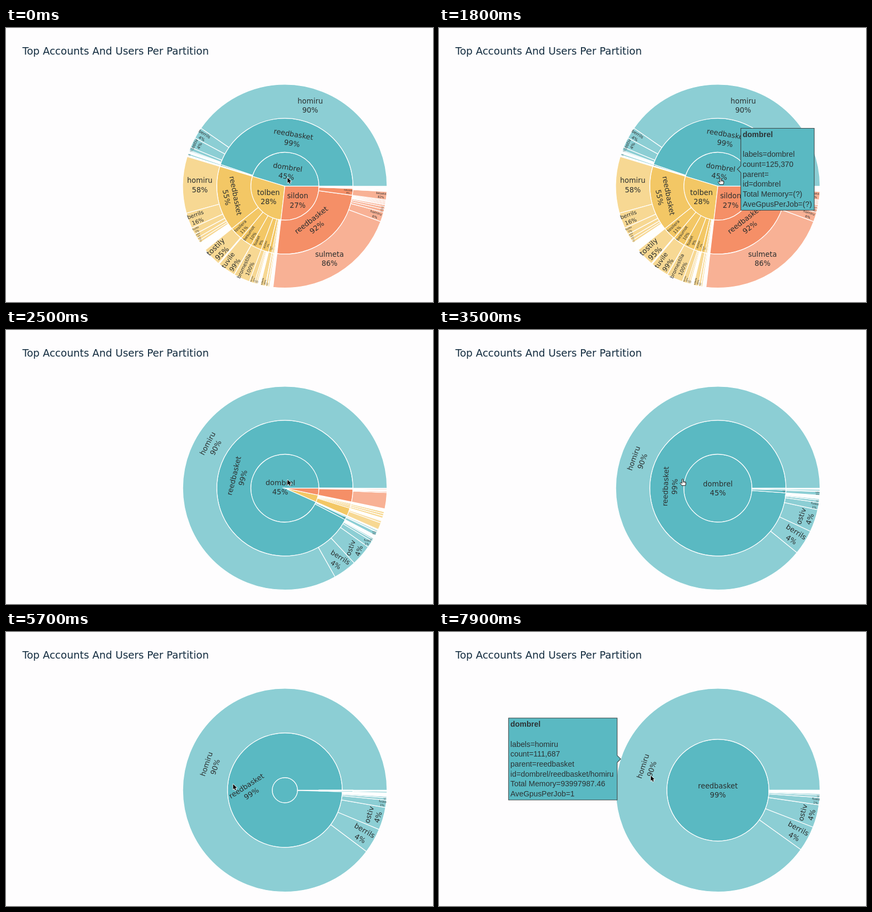
These frames come from a looping animation (800x515 px, 8000 ms). An HTML page with a canvas:

```html
<!DOCTYPE html>
<html lang="en">
<head>
<meta charset="utf-8">
<title>Top Accounts And Users Per Partition</title>
<style>
html, body { margin: 0; width: 100%; height: 100%; overflow: hidden; background: #fefdfe; }
canvas { display: block; width: 800px; height: 515px; }
</style>
</head>
<body>
<canvas id="stage"></canvas>
<script>
const W = 800, H = 515, CX = 522.5, CY = 297.3, R = 191.4;
const LOOP = 8000, ZOOM = 750, ZOOM_A = 1842, ZOOM_B = 5230;
const SIZE = 13.4;
const SANS = '"DejaVu Sans", Verdana, sans-serif';
const ARIAL = '"Liberation Sans", Arial, sans-serif';

const canvas = document.getElementById('stage');
const ctx = canvas.getContext('2d');
const dpr = window.devicePixelRatio || 1;
canvas.width = W * dpr;
canvas.height = H * dpr;

const lerp = (a, b, p) => a + (b - a) * p;
const clamp = v => Math.max(0, Math.min(1, v));
const rad = deg => deg * Math.PI / 180;

// Pose of a label in each zoom stage: [h|t|r = level, tangential, radial; radius; size]
const node = (share, name = '', pct = '', poses = [], kids = []) =>
  ({ share, name, pct, poses, kids, box: [], exit: [] });
const thin = (n, total) => Array.from({ length: n }, () => node(total / n));

const mainAccount = node(98.89, 'reedbasket', '99%', [['t', 90.5], ['t', 89.7], ['h', 0]], [
  node(90.09, 'homiru', '90%', [['h', 159], ['t', 159], ['t', 139]]),
  node(4, 'berrils', '4%', [['r', 179.5, 7.8], ['r', 168], ['r', 167]]),
  node(3.6, 'ostiv', '4%', [['t', 182, 7.8], ['t', 173], ['t', 173]]),
  node(1.15, 'fusko', '1%', [['r', 187, 2.6], ['r', 184, 5.4], ['r', 184.5, 5.4]]),
  node(0.37, 'lodet', '0%', [['r', 188, 1], ['r', 188, 2], ['r', 188, 2]]),
  node(0.22),
  ...thin(9, 0.57)
]);

const teal = node(45.3, 'dombrel', '45%', [['t', 27.5], ['h', 0]], [
  mainAccount,
  node(0.67, 'nusto', '1%', [['r', 125, 1], ['r', 124, 2]], [
    node(88, 'selbo', '90%', [['r', 188, 1.5], ['r', 187, 3]]), ...thin(2, 12)]),
  node(0.27, '', '', [], [node(90), node(10)]),
  ...thin(3, 0.17)
]);

const yellow = node(27.85, 'tolben', '28%', [['h', 36.7]], [
  node(55.6, 'reedbasket', '55%', [['t', 102.5]], [
    node(58, 'homiru', '58%', [['h', 159.5]]),
    node(16, 'berrils', '16%', [['r', 176, 10.2]]),
    node(7, 'fusko', '7%', [['r', 185, 4.8]]),
    node(4.6, 'ostiv', '5%', [['r', 186, 3.4]]),
    node(3, 'lodet', '3%', [['r', 187, 2.2]]),
    node(2.4, 'nerik', '2%', [['r', 188, 1.8]]),
    ...thin(14, 9)
  ]),
  node(11.1, 'tosilera', '11%', [['r', 112, 7.7]], [
    node(95, 'tostily', '95%', [['r', 172.5]]), ...thin(2, 5)]),
  node(10.4, 'besumot', '10%', [['r', 111, 7.3]], [
    node(99, 'tuvile', '99%', [['r', 175, 12]]), node(1)]),
  node(9.2, 'fosket', '9%', [['r', 115, 6.6]], [
    node(100, 'bromestila', '100%', [['r', 168.5, 9.4]])]),
  node(6.5, 'dulsko', '7%', [['r', 116, 4.6]], [
    node(45, 'denolo', '45%', [['r', 185, 3.4]]),
    node(16, 'lusk', '16%', [['r', 187, 2.2]]),
    node(13, 'bost', '13%', [['r', 187, 1.8]]),
    ...thin(5, 26)
  ]),
  node(3, 'felsok', '3%', [['r', 120, 2.8]], [
    node(95, 'noleda', '95%', [['r', 184, 4]]), node(5)]),
  node(1.4, '', '', [], [node(88, 'pelso', '88%', [['r', 187, 2]]), ...thin(2, 12)]),
  node(0.9, '', '', [], [node(90), node(10)]),
  ...thin(4, 1.9)
]);

const orange = node(26.85, 'sildon', '27%', [['h', 36]], [
  node(92, 'reedbasket', '92%', [['t', 89]], [
    node(86, 'sulmeta', '86%', [['h', 160]]),
    node(6.2, 'homiru', '6%', [['r', 178, 6.3]]),
    node(1.9, 'ostiv', '2%', [['r', 187, 2.4]]),
    node(1.6, 'lodet', '2%', [['r', 187, 2]]),
    node(1.2),
    ...thin(5, 3.3)
  ]),
  node(6, 'kelundo', '6%', [['r', 119, 4]], [
    node(82, 'besoka', '82%', [['r', 181, 5.4]]), ...thin(3, 18)]),
  node(0.7, '', '', [], thin(2, 1)),
  ...thin(3, 1.3)
]);

const all = [];

function collect(n, depth, rgb) {
  n.depth = depth;
  const a = depth === 2 ? 0.7 : 1;
  n.fill = 'rgb(' + rgb.map(c => Math.round(lerp(255, c, a))).join() + ')';
  all.push(n);
  n.kids.forEach(k => collect(k, depth + 1, rgb));
}

function place(n, x0, x1, depth, rings, stage) {
  n.box[stage] = { x0, x1, r0: depth * R / rings, r1: (depth + 1) * R / rings };
  spread(n.kids, x0, x1, depth + 1, rings, stage);
}

function spread(kids, x0, x1, depth, rings, stage) {
  const sum = kids.reduce((s, k) => s + k.share, 0);
  let a = x0;
  for (const k of kids) {
    const b = a + (x1 - x0) * k.share / sum;
    place(k, a, b, depth, rings, stage);
    a = b;
  }
}

// Slices that leave: inner ones shrink to the hub, the rest fold up at the end angle.
function setExits(entry, stage) {
  const e = entry.box[stage];
  for (const n of all) {
    const b = n.box[stage];
    if (!b || n.box[stage + 1]) continue;
    n.exit[stage] = b.r1 < e.r1 - 0.01
      ? { x0: b.x0, x1: b.x1, r0: 0, r1: 0 }
      : { x0: 360, x1: 360, r0: b.r0, r1: b.r1 };
  }
}

const tops = [teal, yellow, orange];
collect(teal, 0, [90, 185, 194]);
collect(yellow, 0, [243, 199, 101]);
collect(orange, 0, [245, 143, 103]);
spread(tops, 0, 360, 0, 3, 0);
place(teal, 0, 360, 0, 3, 1);
place(mainAccount, 0, 360, 0, 2, 2);
setExits(teal, 0);
setExits(mainAccount, 1);

function mix(a, b, p) {
  const out = {};
  for (const key in a) out[key] = lerp(a[key], b[key], p);
  return out;
}

function sector(b, fill) {
  const a0 = -rad(b.x0), a1 = -rad(b.x1);
  ctx.beginPath();
  if (b.x1 - b.x0 > 359.99) {
    ctx.arc(CX, CY, b.r1, 0, Math.PI * 2);
  } else {
    ctx.arc(CX, CY, b.r1, a0, a1, true);
    if (b.r0 > 0) ctx.arc(CX, CY, b.r0, a1, a0, false);
    else ctx.lineTo(CX, CY);
    ctx.closePath();
  }
  ctx.fillStyle = fill;
  ctx.fill();
  ctx.strokeStyle = '#fff';
  ctx.lineWidth = 1.25;
  ctx.stroke();
}

function upright(deg) {
  while (deg <= -90) deg += 180;
  while (deg > 90) deg -= 180;
  return deg;
}

function pose(n, stage) {
  const [mode, r, size = SIZE] = n.poses[stage];
  const b = n.box[stage], mid = (b.x0 + b.x1) / 2;
  const tilt = mode === 'h' ? 0 : upright(mode === 't' ? 90 - mid : -mid);
  return { mid, r, size, tilt };
}

function label(n, stage, p) {
  let q = pose(n, stage);
  if (p > 0) {
    const next = pose(n, stage + 1);
    const r = lerp(q.r, next.r, next.r === 0 ? p ** 3 : p);
    q = mix(q, next, p);
    q.r = r;
  }
  ctx.save();
  ctx.translate(CX + q.r * Math.cos(rad(q.mid)), CY - q.r * Math.sin(rad(q.mid)));
  ctx.rotate(rad(q.tilt));
  ctx.scale(q.size / SIZE, q.size / SIZE);
  ctx.font = SIZE + 'px ' + SANS;
  ctx.textAlign = 'center';
  ctx.fillStyle = '#2a2e2e';
  ctx.fillText(n.name, 0, -3.8);
  ctx.fillText(n.pct, 0, 13.5);
  ctx.restore();
}

function chart(t) {
  const stage = t > ZOOM_B ? 1 : 0;
  const p = clamp((t - (stage ? ZOOM_B : ZOOM_A)) / ZOOM);
  const shown = all.filter(n => n.box[stage] && (n.box[stage + 1] || p < 1));
  for (const n of shown) {
    const to = n.box[stage + 1] || n.exit[stage];
    sector(mix(n.box[stage], to, p), n.fill);
  }
  for (const n of shown) {
    if (n.name && (p === 0 || n.box[stage + 1])) label(n, stage, p);
  }
}

const tips = [
  { from: 500, to: ZOOM_A, x: 565.5, y: 188.5, w: 137.5, left: true, rows:
    ['labels=dombrel', 'count=125,370', 'parent=', 'id=dombrel', 'Total Memory=(?)', 'AveGpusPerJob=(?)'] },
  { from: 3850, to: ZOOM_B + 20, x: 233, y: 215.5, w: 155.5, rows:
    ['labels=reedbasket', 'count=123,977', 'parent=dombrel', 'id=dombrel/reedbasket', 'Total Memory=(?)', 'AveGpusPerJob=(?)'] },
  { from: 6150, to: LOOP, x: 130.3, y: 161.7, w: 203.5, rows:
    ['labels=homiru', 'count=111,687', 'parent=reedbasket', 'id=dombrel/reedbasket/homiru', 'Total Memory=93997987.46', 'AveGpusPerJob=1'] }
];

function tooltip({ x, y, w, left, rows }) {
  const h = 154, m = y + h / 2, n = 6.6;
  const edge = left ? x : x + w, far = left ? x + w : x;
  ctx.beginPath();
  ctx.moveTo(edge, y);
  ctx.lineTo(edge, m - n);
  ctx.lineTo(edge + (left ? -n : n), m);
  ctx.lineTo(edge, m + n);
  ctx.lineTo(edge, y + h);
  ctx.lineTo(far, y + h);
  ctx.lineTo(far, y);
  ctx.closePath();
  ctx.fillStyle = teal.fill;
  ctx.fill();
  ctx.strokeStyle = '#3c4444';
  ctx.lineWidth = 1.1;
  ctx.stroke();
  ctx.textAlign = 'left';
  ctx.fillStyle = '#2c3234';
  ctx.font = 'bold 14.3px ' + ARIAL;
  ctx.fillText('dombrel', x + 3.5, y + 16.6);
  ctx.font = '14.3px ' + ARIAL;
  rows.forEach((row, i) => ctx.fillText(row, x + 3.5, y + 16.6 + (i + 2) * 18.65));
}

const path = [
  [0, 527.5, 281.5], [3150, 527.5, 281.5], [3500, 456.5, 279.8], [3850, 425.5, 286],
  [5950, 425.5, 286], [6300, 413.7, 280], [6550, 413.7, 280], [7100, 396.8, 270], [LOOP, 396.8, 270]
];
const arrow = new Path2D('M0 0V9.8L2.3 7.7L3.7 11.2L5.5 10.4L4 7.1H7.1Z');
const hand = new Path2D('M-1.2 1Q0 -.6 1.2 1V5L5 5.6Q6.4 6 6.2 8L5.4 12.6H-1.4L-4.6 8.4Q-4.6 6.6 -2.8 7.2L-1.2 8.6Z');
const knuckles = new Path2D('M1.2 5V7.4M3.2 5.4V7.6M5 5.8V7.8');

function pointer(t) {
  const i = path.findIndex(k => k[0] > t);
  const [t0, x0, y0] = path[i - 1], [t1, x1, y1] = path[i];
  const p = (t - t0) / (t1 - t0);
  const isHand = (t >= 500 && t < ZOOM_A) || (t >= 3200 && t < 5150);
  ctx.save();
  ctx.translate(lerp(x0, x1, p), lerp(y0, y1, p));
  ctx.lineJoin = 'round';
  if (isHand) {
    ctx.fillStyle = '#fff';
    ctx.strokeStyle = '#111';
    ctx.lineWidth = 1;
    ctx.fill(hand);
    ctx.stroke(hand);
    ctx.lineWidth = 0.7;
    ctx.stroke(knuckles);
  } else {
    ctx.strokeStyle = '#fff';
    ctx.lineWidth = 1.6;
    ctx.stroke(arrow);
    ctx.fillStyle = '#000';
    ctx.fill(arrow);
  }
  ctx.restore();
}

function draw(t) {
  ctx.setTransform(dpr, 0, 0, dpr, 0, 0);
  ctx.fillStyle = '#fefdfe';
  ctx.fillRect(0, 0, W, H);
  ctx.textAlign = 'left';
  ctx.fillStyle = '#142d40';
  ctx.font = '19.05px ' + SANS;
  ctx.fillText('Top Accounts And Users Per Partition', 30.8, 50);
  chart(t);
  tips.filter(tip => t >= tip.from && t < tip.to).forEach(tooltip);
  pointer(t);
}

const start = performance.now();
function tick() {
  draw((performance.now() - start) % LOOP);
  requestAnimationFrame(tick);
}
tick();
</script>
</body>
</html>
```
